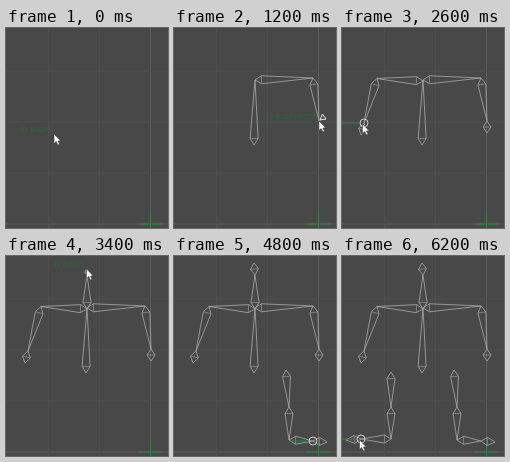
Recreate the animation shown at these times as an HTML page with a canvas. Size 162 by 200 pixels, loop 6400 ms.

```html
<!DOCTYPE html>
<html lang="en">
<head>
<meta charset="utf-8">
<title>Drawing a rig bone by bone</title>
<style>
html, body { margin: 0; width: 100%; height: 100%; overflow: hidden; background: #484848; }
canvas { display: block; width: 100vw; height: 100vh; }
</style>
</head>
<body>
<canvas id="stage"></canvas>
<script>
const W = 162, H = 200, STEP = 200, LOOP = 6400;
const GREEN = '#238a34';
const stage = document.getElementById('stage');
const ctx = stage.getContext('2d');
const scale = window.devicePixelRatio || 1;
stage.width = W * scale;
stage.height = H * scale;

// Each chain pulls one bone per beat from joint to joint; times are in steps.
const chains = [
  { from: 1, beat: 1.5, joints: [[80, 117], [81, 52], [139, 50], [145, 93], [145, 105]] },
  { from: 7.3, beat: 1.8, joints: [[81, 53], [35, 50.5], [22, 95], [19, 107]] },
  { from: 14, beat: 2, joints: [[81, 53], [81, 19], [80, 7]] },
  { from: 20, beat: 1, joints: [[112, 114], [115, 151], [115, 184], [139, 185], [153, 186]] },
  { from: 25, beat: 1.45, joints: [[49, 116], [49, 151], [49, 183], [19, 183], [4, 184]] }
];

const mix = ([x1, y1], [x2, y2], p) => [x1 + (x2 - x1) * p, y1 + (y2 - y1) * p];

function line(points, color, width = 0.8, close = false) {
  ctx.beginPath();
  points.forEach(([x, y]) => ctx.lineTo(x, y));
  if (close) ctx.closePath();
  ctx.strokeStyle = color;
  ctx.lineWidth = width;
  ctx.stroke();
}

function grid() {
  ctx.fillStyle = '#484848';
  ctx.fillRect(0, 0, W, H);
  for (let k = 0; k < 4; k++) {
    const x = 144.5 - 51 * k, y = 196 - 51 * k;
    const color = k ? '#4f4f4f' : '#5c5c5c';
    line([[x, 0], [x, H]], color, 1);
    line([[0, y], [W, y]], color, 1);
  }
  line([[144.5, 183], [144.5, H]], GREEN, 1);
  line([[133, 196], [156, 196]], GREEN, 1);
}

function bone([x1, y1], [x2, y2]) {
  const dx = x2 - x1, dy = y2 - y1, len = Math.hypot(dx, dy);
  const ux = dx / len, uy = dy / len;
  const waist = Math.min(6.5, len / 2), half = Math.min(4, len / 3);
  const x = x1 + ux * waist, y = y1 + uy * waist;
  const a = [x - uy * half, y + ux * half], b = [x + uy * half, y - ux * half];
  line([[x1, y1], a, [x2, y2], b], '#aaa', 0.8, true);
  line([a, b], '#999', 0.7);
}

function pointer([x, y]) {
  ctx.beginPath();
  [[0, 0], [0, 9.5], [2.2, 7.5], [3.9, 11], [5.5, 10.2], [3.9, 7], [6.6, 6.7]]
    .forEach(([dx, dy]) => ctx.lineTo(x + dx, y + dy));
  ctx.closePath();
  ctx.fillStyle = '#fff';
  ctx.fill();
  ctx.strokeStyle = '#333';
  ctx.lineWidth = 0.5;
  ctx.stroke();
}

function labelled([x, y], text = 'D: 0.0271') {
  ctx.font = '7px "Liberation Sans", sans-serif';
  ctx.textAlign = 'right';
  ctx.textBaseline = 'middle';
  ctx.fillStyle = '#216e30';
  ctx.fillText(text, x - 2, y - 4);
  pointer([x, y]);
}

// A bone that has hardly begun shows as a bright triangle.
function sprout([x, y]) {
  line([[x + 1, y - 1], [x + 7, y - 2], [x + 3.5, y - 7]], '#eee', 1, true);
  labelled([x, y], 'D: 0.027 (0.031)');
}

function handle([x, y], dropped) {
  line([[x - 22, y], [x - 4, y]], GREEN, 1);
  ctx.beginPath();
  ctx.arc(x, y, 4, 0, 2 * Math.PI);
  ctx.strokeStyle = '#ccc';
  ctx.lineWidth = 1;
  ctx.stroke();
  if (dropped) pointer([x - 1.5, y + 1]);
}

function draw(step) {
  ctx.setTransform(scale, 0, 0, scale, 0, 0);
  grid();
  let rest = [48, 106], end = -1;
  let hand = () => labelled(rest);
  for (const { from, beat, joints } of chains) {
    if (step < from) {
      // After a short hold the pointer travels to the next root.
      if (end > 0 && step > end + 0.5) hand = () => labelled(mix(rest, joints[0], 0.8));
      break;
    }
    const grown = (step - from) / beat, count = joints.length - 1;
    for (let i = 0; i < count && i <= grown; i++) {
      const head = joints[i], tip = mix(head, joints[i + 1], Math.min(1, grown - i));
      if (Math.hypot(tip[0] - head[0], tip[1] - head[1]) < 5) {
        hand = () => sprout(head);
      } else {
        bone(head, tip);
        hand = () => labelled(tip);
      }
    }
    end = from + beat * count;
    rest = joints[count];
    if (step >= end) {
      const dropped = step > end;
      hand = () => handle(joints[count - 1], dropped);
    }
  }
  hand();
}

function tick(now) {
  draw(Math.floor((now % LOOP) / STEP));
  requestAnimationFrame(tick);
}
draw(0);
requestAnimationFrame(tick);
</script>
</body>
</html>
```
